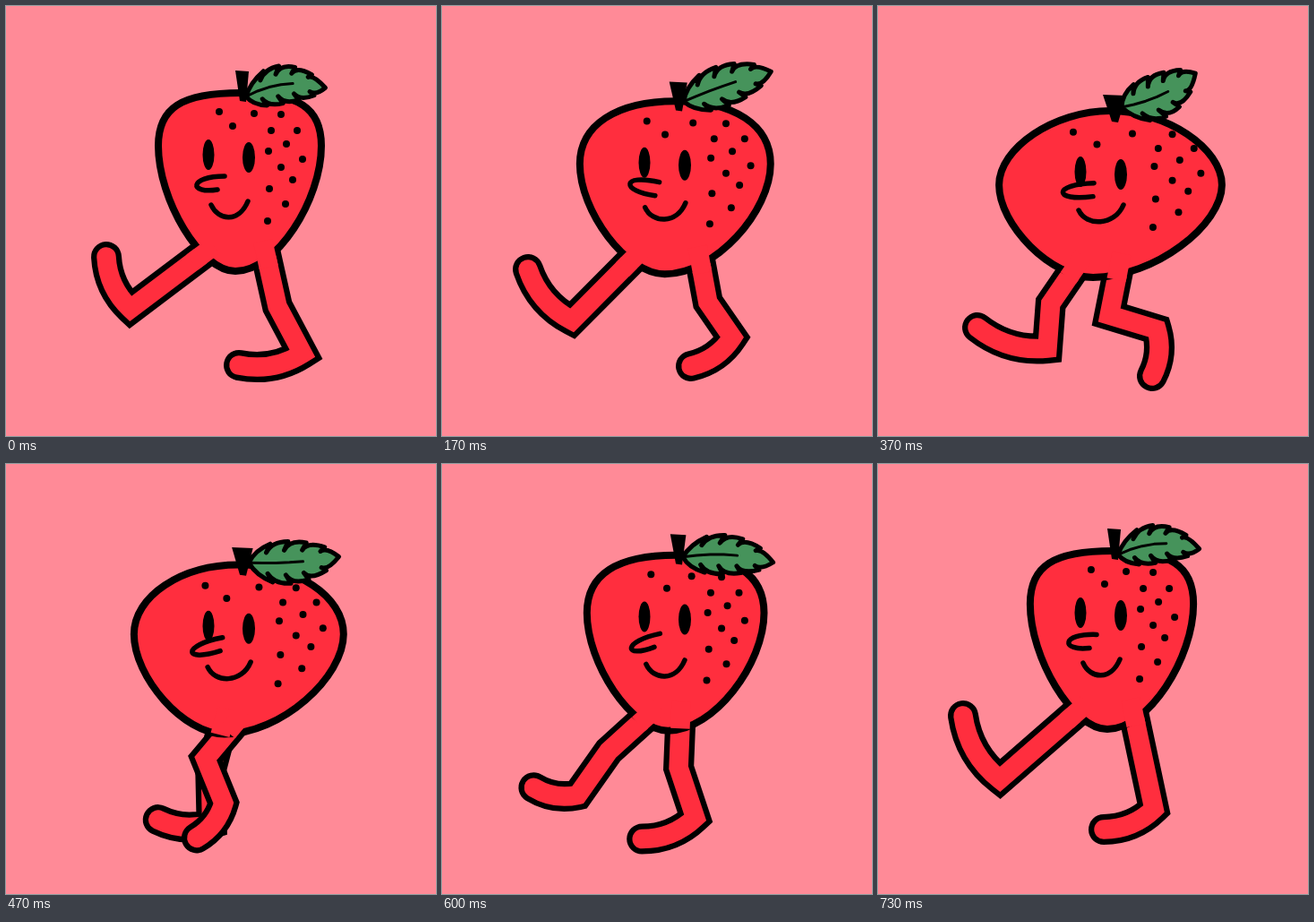
Write an HTML page with a canvas that moves like this. It is 480 px wide and 480 px high and loops after 0.76 s.

```html
<!DOCTYPE html>
<html lang="en">
<head>
<meta charset="utf-8">
<title>Walking strawberry</title>
<style>
html, body { margin: 0; width: 100%; height: 100%; overflow: hidden; background: #ff8a97; }
canvas { display: block; }
</style>
</head>
<body>
<canvas id="stage" width="480" height="480"></canvas>
<script>
const ctx = document.getElementById('stage').getContext('2d');
const PINK = '#ff8a97', RED = '#ff2e3e', GREEN = '#46935b', BLACK = '#000';

// One loop is one step; the legs then swap places, so a leg's cycle takes two loops.
const LOOP = 760;
// Drawings are held, so the pose only advances at these times (ms).
const HOLDS = [0, 70, 100, 170, 230, 270, 330, 370, 430, 470, 500, 530, 600, 630, 700, 730];
const KEY_TIMES = [0, 170, 270, 370, 530, 630, 730];
const LEAF_ANGLES = [-.11, -.33, -.57, -.43, .15, .02, -.07];

// Key positions of one leg: hip x, knee bend, ankle x y, toe x y.
const STRIDE = [
  [220, 0, 139, 338, 112, 280],
  [212, 0, 145, 351, 96, 294],
  [212, 0, 156, 369, 97, 316],
  [221, 13, 189, 382, 111, 359],
  [256, 5, 254, 413, 205, 420],
  [271, 13, 295, 387, 231, 418],
  [285, 0, 308, 385, 252, 408],
  [290, 8, 331, 388, 260, 401],
  [288, 10, 324, 370, 278, 402],
  [283, 20, 320, 361, 281, 401],
  [269, 37, 311, 361, 306, 413],
  [250, 22, 202, 389, 157, 420],
  [222, 0, 130, 361, 79, 336],
  [222, 0, 136, 352, 95, 281]
];

const SEEDS = [[238, 118], [253, 134], [277, 120], [307, 121], [296, 139], [325, 139], [313, 154],
  [293, 162], [331, 171], [307, 180], [320, 194], [294, 204], [312, 221], [292, 240]];

const mix = (a, b, u) => a + (b - a) * u;

// Blends the keys around the given time.
function sample(keys, time) {
  const count = KEY_TIMES.length;
  const timeOf = k => KEY_TIMES[k % count] + LOOP * Math.floor(k / count);
  let i = 0;
  while (timeOf(i + 1) <= time) i++;
  const u = (time - timeOf(i)) / (timeOf(i + 1) - timeOf(i));
  const a = keys[i], b = keys[(i + 1) % keys.length];
  return Array.isArray(a) ? a.map((v, k) => mix(v, b[k], u)) : mix(a, b, u);
}

function fill(path, color) {
  ctx.fillStyle = color;
  ctx.fill(path);
}

function stroke(path, width, color = BLACK) {
  ctx.lineWidth = width;
  ctx.strokeStyle = color;
  ctx.stroke(path);
}

function line(...points) {
  const path = new Path2D();
  points.forEach(p => path.lineTo(...p));
  return path;
}

function oval(x, y, rx, ry) {
  const path = new Path2D();
  path.ellipse(x, y, rx, ry, 0, 0, 7);
  fill(path, BLACK);
}

function bezier(start, ...controls) {
  const path = new Path2D();
  path.moveTo(...start);
  path.bezierCurveTo(...controls.flat());
  return path;
}

// Draws a leg and returns the short stretch that joins it to the body.
function drawLeg(time, squash) {
  const [hx, bend, ax, ay, tx, ty] = sample(STRIDE, time);
  const hy = 277 + 14 * squash;
  const length = Math.hypot(ax - hx, ay - hy);
  const kx = (hx + ax) / 2 - bend * (ay - hy) / length;
  const ky = (hy + ay) / 2 + bend * (ax - hx) / length;
  const leg = line([hx, hy], [kx, ky], [ax, ay]);
  const arch = .2;
  leg.quadraticCurveTo((ax + tx) / 2 + arch * (ty - ay), (ay + ty) / 2 - arch * (tx - ax), tx, ty);
  ctx.lineJoin = 'miter';
  ctx.lineCap = 'round';
  stroke(leg, 34);
  stroke(leg, 21.5, RED);
  const thigh = Math.hypot(kx - hx, ky - hy);
  const dx = 15 * (kx - hx) / thigh, dy = 15 * (ky - hy) / thigh;
  return line([hx - dx, hy - dy], [hx + dx, hy + dy]);
}

// The berry widens and sinks as squash goes from 0 to 1.
function bodyPath(squash) {
  const left = 170 - 35 * squash, right = 352 + 32 * squash, side = 156 + 44 * squash;
  const midX = 262 - 3 * squash, top = 97 + 20 * squash;
  const lowX = 256 - 16 * squash, low = 296 + 7 * squash;
  const full = .72 - .22 * squash;
  const shoulder = mix(side, top, full), flank = mix(side, low, .43);
  const path = new Path2D();
  path.moveTo(left, side);
  path.bezierCurveTo(left, shoulder, mix(midX, left, full), top, midX, top);
  path.bezierCurveTo(mix(midX, right, full), top, right, shoulder, right, side);
  path.bezierCurveTo(right, flank, mix(lowX, right, .48), low, lowX, low);
  path.bezierCurveTo(mix(lowX, left, .45), low, left, flank, left, side);
  path.closePath();
  return path;
}

function drawFace(squash, tilt) {
  oval(226, 166 + 19 * squash, 6.5, 17);
  oval(271, 169 + 19 * squash, 7, 17);
  const drop = 8 * squash + 3 * tilt, tip = 204 - 9 * squash;
  stroke(bezier([244 - 3 * squash, 190 + drop], [tip, 190 + drop - 10 * tilt],
    [tip, 210 + drop - 10 * tilt], [236 + 4 * squash, 205 + drop]), 5.5);
  const lx = 229 - 5 * squash, ly = 222 + 6 * squash, rx = 270 + 4 * squash, ry = 218 + 4 * squash;
  stroke(bezier([lx, ly], [lx + 8, ly + 18], [rx - 10, ry + 24], [rx, ry]), 5.5);
}

function drawLeaf(angle, squash, tilt) {
  const teeth = 5, length = 89 + 14 * Math.abs(tilt);
  const half = 20 + 3 * squash, bow = -18 + 30 * squash;
  const bx = 268 + 4 * squash, by = 101 + 12 * squash;
  const cos = Math.cos(angle), sin = Math.sin(angle);
  // Maps a place along the spine (0 to 1) and across the blade (-1 to 1) to the stage.
  const at = (s, across) => {
    const u = s * length;
    const v = 2 * s * (1 - s) * bow + across * half * Math.sin(Math.PI * Math.min(1, s) ** .8) ** .6;
    return [bx + u * cos - v * sin, by + u * sin + v * cos];
  };
  const outline = new Path2D();
  for (const side of [-1, 1]) {
    outline.moveTo(bx, by);
    for (let i = 1; i <= teeth; i++) {
      const end = i / teeth;
      outline.quadraticCurveTo(...at(end - .13, side * 1.15), ...at(Math.min(1, end + .05), side * 1.05));
      if (i < teeth) outline.lineTo(...at(end, side * .62));
    }
  }
  fill(outline, GREEN);
  stroke(outline, 5);
  stroke(line(...[0, .15, .3, .45, .6].map(s => at(s, 0))), 3);
}

function draw(time) {
  const swing = Math.PI * time / 715;
  const squash = Math.sin(swing) ** 2, tilt = Math.sin(2 * swing);
  ctx.fillStyle = PINK;
  ctx.fillRect(0, 0, 480, 480);

  const joints = [drawLeg(time, squash), drawLeg(time + LOOP, squash)];
  const body = bodyPath(squash);
  fill(body, RED);
  stroke(body, 8);
  ctx.lineCap = 'butt';
  joints.forEach(joint => stroke(joint, 21.5, RED));

  ctx.lineCap = ctx.lineJoin = 'round';
  for (const [x, y] of SEEDS) {
    const u = x - 290;
    oval(x + squash * (14 + .5 * u - .003 * u * u), y + squash * (16 - .13 * (y - 170)), 4, 4);
  }
  drawFace(squash, tilt);

  const stemTop = 72 + 27 * squash, stemLow = 107 + 23 * squash;
  fill(line([256 - 5 * squash, stemTop], [271 + 6 * squash, stemTop + 1],
    [268, stemLow], [261, stemLow - 1]), BLACK);
  drawLeaf(sample(LEAF_ANGLES, time), squash, tilt);
}

function frame() {
  const time = performance.now() % LOOP;
  draw(HOLDS.findLast(t => t <= time));
  requestAnimationFrame(frame);
}
frame();
</script>
</body>
</html>
```
